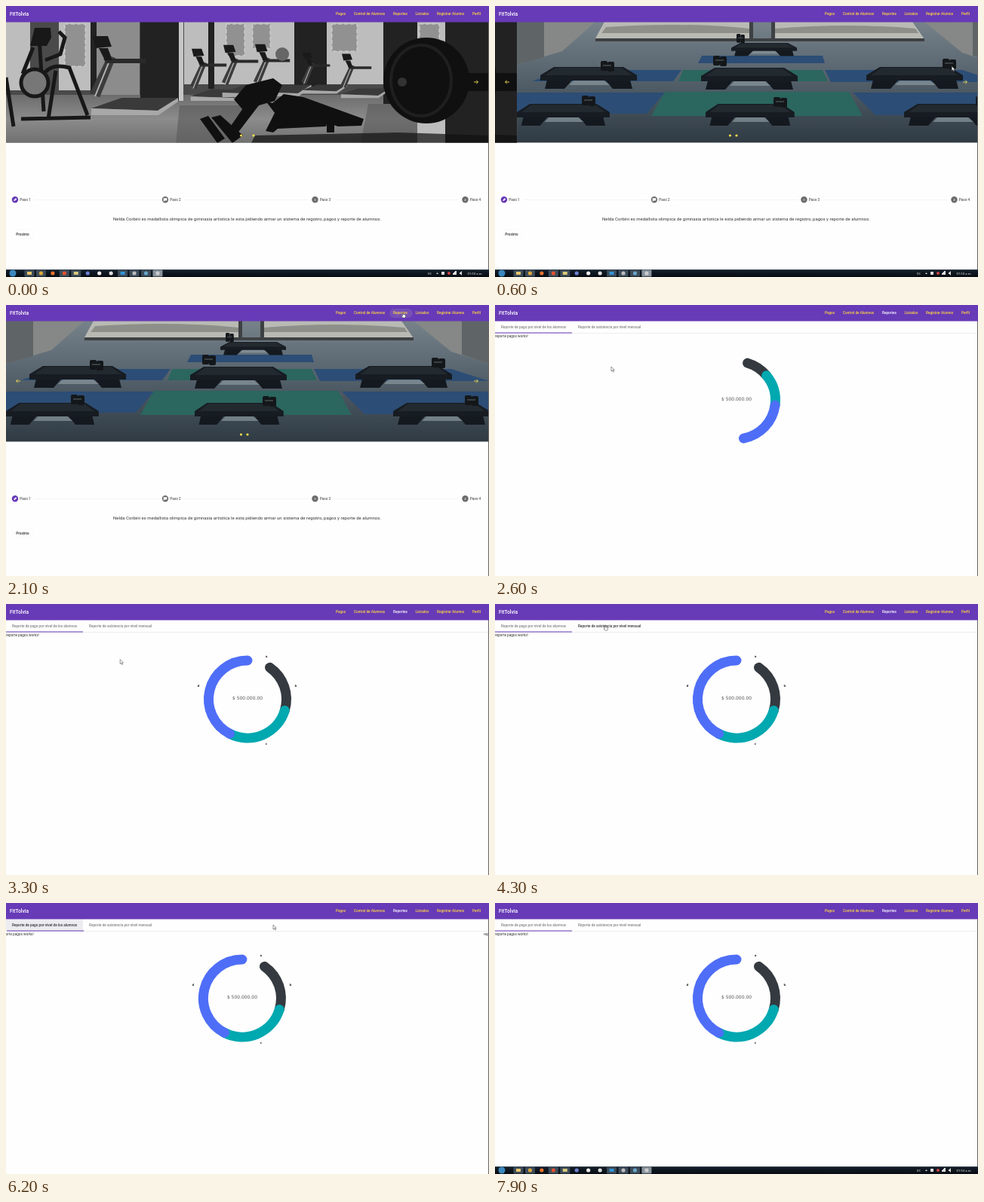
Recreate the animation shown at these times as an HTML page. Size 640 by 360 pixels, loop 8 s.

```html
<!DOCTYPE html>
<html lang="es">
<head>
<meta charset="utf-8">
<style>
  html, body { margin: 0; height: 100%; overflow: hidden; background: #fefefe; }
  svg { display: block; width: 100vw; height: 100vh; }
  text { font: 4.67px Roboto, sans-serif; fill: #333; }
  .medium { font-weight: 500; }
  #nav text { fill: #ffd740; }
  #sum { font: 6px "DejaVu Sans", sans-serif; fill: #555; }
  #labels text { font: bold 4px "DejaVu Sans", sans-serif; }
  #donut path { fill: none; stroke-width: 13; stroke-linecap: round; }
  .amber { fill: none; stroke: #f2dc55; stroke-width: .9; }
</style>
</head>
<body>
<svg viewBox="0 0 640 360">
  <defs>
    <linearGradient id="floor" x2="0" y2="1"><stop stop-color="#6c6c6c"/><stop offset=".5" stop-color="#8c8c8c"/><stop offset="1" stop-color="#707070"/></linearGradient>
    <linearGradient id="room" x2="0" y2="1"><stop stop-color="#77828a"/><stop offset=".4" stop-color="#596670"/><stop offset="1" stop-color="#2f3a43"/></linearGradient>
    <linearGradient id="bar" x2="0" y2="1"><stop stop-color="#35424e"/><stop offset=".2" stop-color="#111b26"/><stop offset="1" stop-color="#070c12"/></linearGradient>
    <clipPath id="banner"><path d="M0 21H640V181.500H0Z"/></clipPath>
    <g id="treadmill">
      <path d="M-2 88L38 74H113L86 91Z" fill="#3a3a3a"/>
      <path d="M-2 88L86 91 113 74V79L87 97H-2Z" fill="#a8a8a8"/>
      <path d="M27 20L6 72M20 26L0 68" fill="none" stroke="#3c3c3c" stroke-width="7"/>
      <path d="M24 20L3 72" fill="none" stroke="#b4b4b4" stroke-width="2"/>
      <path d="M14 22H70V28H18Z" fill="#2a2a2a"/>
      <path d="M0 -8H20L25 6 4 8ZM8 8H20L26 24H16Z" fill="#1a1a1a"/>
    </g>
    <g id="step">
      <path d="M10 13H46L32 29H6ZM82 13H118L122 29H96Z" fill="#14191f"/>
      <path d="M46 16H82L92 24H38Z" fill="#8b979d" opacity=".7"/>
      <path d="M18 0H110L128 11V18H0V11Z" fill="#171c22"/>
      <path d="M20 1H108L122 11H6Z" fill="#22292f"/>
    </g>
    <g id="weights" fill="#14171a"><rect width="9" height="13" rx="2"/><rect x="9" y="1" width="9" height="13" rx="2"/><path d="M3 5H14V7H3Z" fill="#3a3f42"/></g>
  </defs>

  <g id="home">
    <g clip-path="url(#banner)">
      <g id="slides">
        <g>
          <path d="M0 21H640V182H0Z" fill="#4a4a4a"/>
          <path d="M0 118H640V182H0Z" fill="url(#floor)"/>
          <path d="M0 21H32V112H0ZM70 21H112V112H70ZM236 21H268V104H236ZM276 21H382V104H276ZM425 21H500V104H425ZM545 21H582V182H545Z" fill="#bdbdbd"/>
          <path d="M120 21H177V118H120Z" fill="#8c8c8c"/>
          <path d="M78 24H105V80H78ZM292 24H316V66H292ZM327 24H350V56H327ZM432 24H465V60H432ZM548 24H574V50H548Z" fill="#919191" stroke="#d6d6d6" stroke-dasharray="5 3"/>
          <path d="M112 21H120V116H112ZM178 21H229V126H178ZM268 21H276V110H268ZM382 21H425V108H382ZM500 21H545V130H500ZM582 21H640V182H582Z" fill="#222"/>
          <path d="M229 21H235V126H229Z" fill="#c6c6c6"/>
          <path d="M230 132H320L300 182H225ZM480 130H545V182H470Z" fill="#5a5a5a" opacity=".6"/>
          <use href="#treadmill" x="115" y="48"/>
          <use href="#treadmill" transform="translate(246 62) scale(.66)"/>
          <use href="#treadmill" transform="translate(288 57) scale(.66)"/>
          <use href="#treadmill" transform="translate(330 56) scale(.66)"/>
          <use href="#treadmill" transform="translate(393 66) scale(.52)"/>
          <use href="#treadmill" transform="translate(445 68) scale(.56)"/>
          <circle cx="366" cy="64" r="9" fill="#666"/>
          <g fill="none" stroke="#181818" stroke-width="5">
            <path d="M44 42L50 140M52 72L72 64 78 42 70 34M36 55L22 90M52 88Q62 76 84 82L108 145M66 86L56 150M0 95L10 160M20 150L112 148"/>
            <circle cx="38" cy="102" r="18" fill="#777"/>
          </g>
          <path d="M38 29H59L60 42 54 53H32Z" fill="#181818"/>
          <g fill="#101010">
            <path d="M302 124L318 105 354 96 366 105 356 126 314 138Z"/>
            <path d="M352 130L368 117 394 121 474 150 471 159 440 160 404 148 366 138Z"/>
            <path d="M318 130L338 128 306 170 294 165ZM344 126L384 140 428 148 424 160 360 163 354 168 344 166 356 142ZM425 150H435V168H425Z"/>
            <path d="M257 150L268 146 290 176 280 182ZM272 148L284 145 314 172 300 182Z"/>
            <path d="M330 172L520 168 640 172V182H325Z" opacity=".7"/>
            <path d="M550 89H640V113H550Z"/>
            <circle cx="557" cy="99" r="57"/>
          </g>
          <ellipse cx="550" cy="99" rx="40" ry="47" fill="none" stroke="#1f1f1f" stroke-width="4"/>
          <circle cx="525" cy="101" r="6" fill="#333"/>
        </g>
        <g transform="translate(640)">
          <path d="M0 21H640V182H0Z" fill="url(#room)"/>
          <path d="M0 21H104L60 60 0 78ZM540 21H640V78L590 62Z" fill="#858886"/>
          <path d="M0 21H36V68L0 78ZM604 21H640V78L604 66Z" fill="#5f6566"/>
          <path d="M116 21H308V43H104ZM342 21H524L540 44H342Z" fill="#b9bab4"/>
          <path d="M118 28Q220 21 308 30V36H112ZM342 30Q440 22 528 30L532 36H342Z" fill="#8d8f88"/>
          <path d="M104 43H540V47H104ZM308 21H313V45H308ZM337 21H342V45H337Z" fill="#3e4143"/>
          <path d="M245 66H405L408 76H240ZM60 85H218L207 100H20ZM408 85H590L640 101H416ZM0 115H196L172 143H0ZM445 115H640V145H475Z" fill="#2c4d75"/>
          <path d="M220 85H405L412 100H214ZM196 114H440L458 146H178Z" fill="#2b665f"/>
          <use href="#step" transform="translate(284 49) scale(.68 .6)"/>
          <use href="#step" x="31" y="81"/><use href="#step" x="244" y="82"/><use href="#step" x="463" y="81"/>
          <use href="#step" transform="translate(0 130) scale(.96 1)"/><use href="#step" transform="translate(250 130) scale(.92 1)"/><use href="#step" x="513" y="130"/>
          <use href="#weights" transform="translate(291 37) scale(.6 .9)"/>
          <use href="#weights" x="111" y="73"/><use href="#weights" x="260" y="66"/><use href="#weights" x="564" y="70"/>
          <use href="#weights" x="86" y="119"/><use href="#weights" x="340" y="121"/><use href="#weights" x="608" y="120"/>
        </g>
      </g>
    </g>
    <path class="amber" d="M620 101H625.500M623.200 98.700L625.500 101 623.200 103.300"/>
    <path class="amber" id="back" d="M19 101H13.500M15.800 98.700L13.500 101 15.800 103.300"/>
    <g fill="#ffe04a"><circle cx="311.500" cy="172" r="1.600"/><circle id="dot" cy="172" r="1.600"/></g>

    <path d="M38 257.500H203M237 257.500H401M436 257.500H600" stroke="#e8e8e8" stroke-width=".5"/>
    <g id="steps"></g>
    <path d="M10.300 259L10.700 257.500 13 255.200 14.200 256.400 11.900 258.700Z" fill="#fff"/>
    <path d="M208.700 255.300H213.300V258.500H210.500L208.700 260Z" fill="#fff"/>
    <text x="319.500" y="285" text-anchor="middle" style="font-size:6px">Nelda Corbini ex medallista olimpica de gimnasia artistica le esta pidiendo armar un sistema de registro, pagos y reporte de alumnos.</text>
    <rect x="9.500" y="297.500" width="26" height="11" rx="1" fill="#fff" stroke="#fafafa"/>
    <text class="medium" x="13.300" y="304.500">Proximo</text>
  </g>

  <g id="reports">
    <path id="focus" d="M0 22H102V37H0Z" fill="#ececf0"/>
    <text class="medium" id="tab1" x="8" y="31">Reporte de pago por nivel de los alumnos</text>
    <text class="medium" id="tab2" x="110" y="31">Reporte de asistencia por nivel mensual</text>
    <path d="M0 37.500H640" stroke="#e2e2e2" stroke-width=".6"/>
    <rect id="ink" y="36.500" height="1" fill="#673ab7"/>
    <g id="panels">
      <text y="42.500">reporte pagos works!</text>
      <text x="640" y="42.500">reporte asistencia works!</text>
      <g id="donut"><path stroke="#343a40"/><path stroke="#00a8b0"/><path stroke="#4f6ef7"/></g>
      <text id="sum" x="320" y="127" text-anchor="middle">$ 500.000.00</text>
      <g id="labels" text-anchor="middle"><text x="345" y="70.500">a</text><text x="384" y="109.500">b</text><text x="345" y="187">c</text><text x="255" y="109.500">d</text></g>
    </g>
  </g>

  <path d="M639.500 21V360" stroke="#666"/>
  <path d="M0 0H640V21.500H0Z" fill="#673ab7"/>
  <rect id="pill" x="508" y="5" width="31" height="12" rx="6" fill="#7650b6"/>
  <text class="medium" x="5" y="13" style="font-size:6.670px;fill:#fff">FitTolvia</text>
  <g id="nav"></g>

  <g id="taskbar">
    <path d="M0 350H640V360H0Z" fill="url(#bar)"/>
    <circle cx="9" cy="355" r="4.500" fill="#3b87bd"/>
    <g id="apps"></g>
    <text x="559" y="356.500" style="fill:#ddd;font-size:4px">ES</text>
    <path d="M570 356L571.500 354 573 356ZM577 353H581V357H577ZM592 357V355H593V354H594V353H595V352H597V357ZM601 354H602L604 352V358L602 356H601Z" fill="#ddd"/>
    <circle cx="587" cy="355" r="2" fill="#c44"/>
    <text x="611.500" y="356.700" style="fill:#eee;font-size:4.300px">01:53 a.m.</text>
  </g>

  <g id="cursor" fill="#fff" stroke="#333" stroke-width=".5">
    <path id="arrow" d="M0 0V6L1.500 4.700 2.500 7 3.500 6.500 2.500 4.400H4.300Z"/>
    <path id="hand" d="M-.5 0H.5V2.500L3.500 3.200V5.500L2.800 7H-.5L-2 4.500-1.500 4-.5 4.700Z"/>
  </g>
</svg>
<script>
const $ = id => document.getElementById(id);
const show = (id, on) => $(id).style.display = on ? '' : 'none';
const clamp = x => Math.max(0, Math.min(1, x));
const span = (t, start, length) => clamp((t - start) / length);

// cubic-bezier(.35, 0, .25, 1)
function ease(x) {
  let lo = 0, hi = 1;
  for (let i = 0; i < 24; i++) {
    const s = (lo + hi) / 2, r = 1 - s;
    if (1.05 * r * r * s + .75 * r * s * s + s ** 3 < x) lo = s; else hi = s;
  }
  return lo * lo * (3 - 2 * lo);
}

$('nav').innerHTML = [['Pagos', 437], ['Control de Alumnos', 461], ['Reportes', 513],
  ['Listados', 542.5], ['Registrar Alumno', 571], ['Perfil', 618]]
  .map(([label, x]) => `<text class="medium" x="${x}" y="12">${label}</text>`).join('');

$('steps').innerHTML = [12, 211, 409.5, 608.5].map((x, i) =>
  `<circle cx="${x}" cy="257.300" r="4.200" fill="${i ? '#6b6b6b' : '#673ab7'}"/>` +
  (i > 1 ? `<text x="${x}" y="258.900" text-anchor="middle" style="fill:#fff;font-size:4.300px">${i + 1}</text>` : '') +
  `<text x="${x + 6.3}" y="259">Paso ${i + 1}</text>`).join('');

const appColors = ['#e5c46b', '#dba63c', '#e8722c', '#e2512f', '#d8c878', '#6d7fd0',
  '#eee', '#ddd', '#3293d6', '#bbb', '#68a5c8', '#ccc'];
$('apps').innerHTML = appColors.map((color, i) => {
  const x = 31 + i * 15.45, open = [0, 1, 3, 4, 8, 9, 10, 11].includes(i);
  return (open ? `<rect x="${x - 6.5}" y="350.500" width="13" height="9" rx="1" fill="${i == 11 ? '#87929c' : '#3d4c59'}"/>` : '') +
    (i % 4 ? `<circle cx="${x}" cy="355" r="2.600" fill="${color}"/>` : `<rect x="${x - 3}" y="353" width="6" height="4" fill="${color}"/>`);
}).join('');

function arc(from, to) {
  const point = deg => {
    const a = deg * Math.PI / 180;
    return `${320 + 51.5 * Math.sin(a)} ${126.5 - 51.5 * Math.cos(a)}`;
  };
  return `M${point(from)}A51.5 51.5 0 0 1 ${point(to)}`;
}

// time, x, y
const route = [[100, 610, 230], [350, 622, 101], [500, 622, 101], [900, 555, 17],
  [1500, 550, 14], [2000, 526, 10], [2200, 526, 10], [2600, 154, 82], [3600, 150, 70],
  [4100, 146, 28], [4500, 146, 28], [4900, 170, 90], [5300, 120, 80], [5600, 50, 28],
  [5800, 50, 28], [6200, 354, 29], [6750, 480, 225], [7300, 632, 155]];

function cursorAt(t) {
  const i = Math.max(1, route.findIndex(k => k[0] >= t));
  const [t0, x0, y0] = route[i - 1], [t1, x1, y1] = route[i];
  const p = span(t, t0, t1 - t0);
  return [x0 + (x1 - x0) * p, y0 + (y1 - y0) * p];
}

const bounds = [35, 107, 207, 360];
const arcs = [...$('donut').children];

function draw(t) {
  const onHome = t < 2200;
  show('home', onHome);
  show('reports', !onHome);
  show('taskbar', t < 1100 || t >= 7800);

  const slide = ease(span(t, 300, 400));
  $('slides').setAttribute('transform', `translate(${-640 * slide})`);
  show('back', slide > .5);
  $('dot').setAttribute('cx', slide > .5 ? 320 : 328);

  const sweep = span(t, 2200, 850);
  arcs.forEach((path, i) => path.setAttribute('d', arc(bounds[i] * sweep, bounds[i + 1] * sweep)));
  show('donut', sweep > 0);
  show('labels', sweep == 1);

  const tab = ease(span(t, 4500, 500)) - ease(span(t, 5765, 500));
  $('panels').setAttribute('transform', `translate(${-640 * tab})`);
  $('ink').setAttribute('x', 102 * tab);
  $('ink').setAttribute('width', 102 - 2 * tab);
  const focus1 = t >= 5700 && t < 7300, focus2 = t >= 4500 && t < 5700;
  show('focus', focus1 || focus2);
  $('focus').setAttribute('transform', `translate(${focus2 ? 102 : 0})`);
  $('tab1').style.opacity = focus1 ? 1 : .6;
  $('tab2').style.opacity = focus2 || t >= 4100 && t < 4500 ? 1 : .6;

  show('pill', t >= 1900 && t < 2300);
  $('nav').children[2].style.fill = onHome ? '' : '#fff';

  show('cursor', t >= 100 && t < 7300);
  if (t < 7300) {
    const [x, y] = cursorAt(t);
    const pointing = y < 18 && onHome || !onHome && y > 21 && y < 37 && x < 202;
    $('cursor').setAttribute('transform', `translate(${x} ${y})`);
    show('hand', pointing);
    show('arrow', !pointing);
  }
}

function frame() {
  draw(Math.floor(performance.now() % 8000 / 100) * 100);
  requestAnimationFrame(frame);
}
frame();
</script>
</body>
</html>
```
